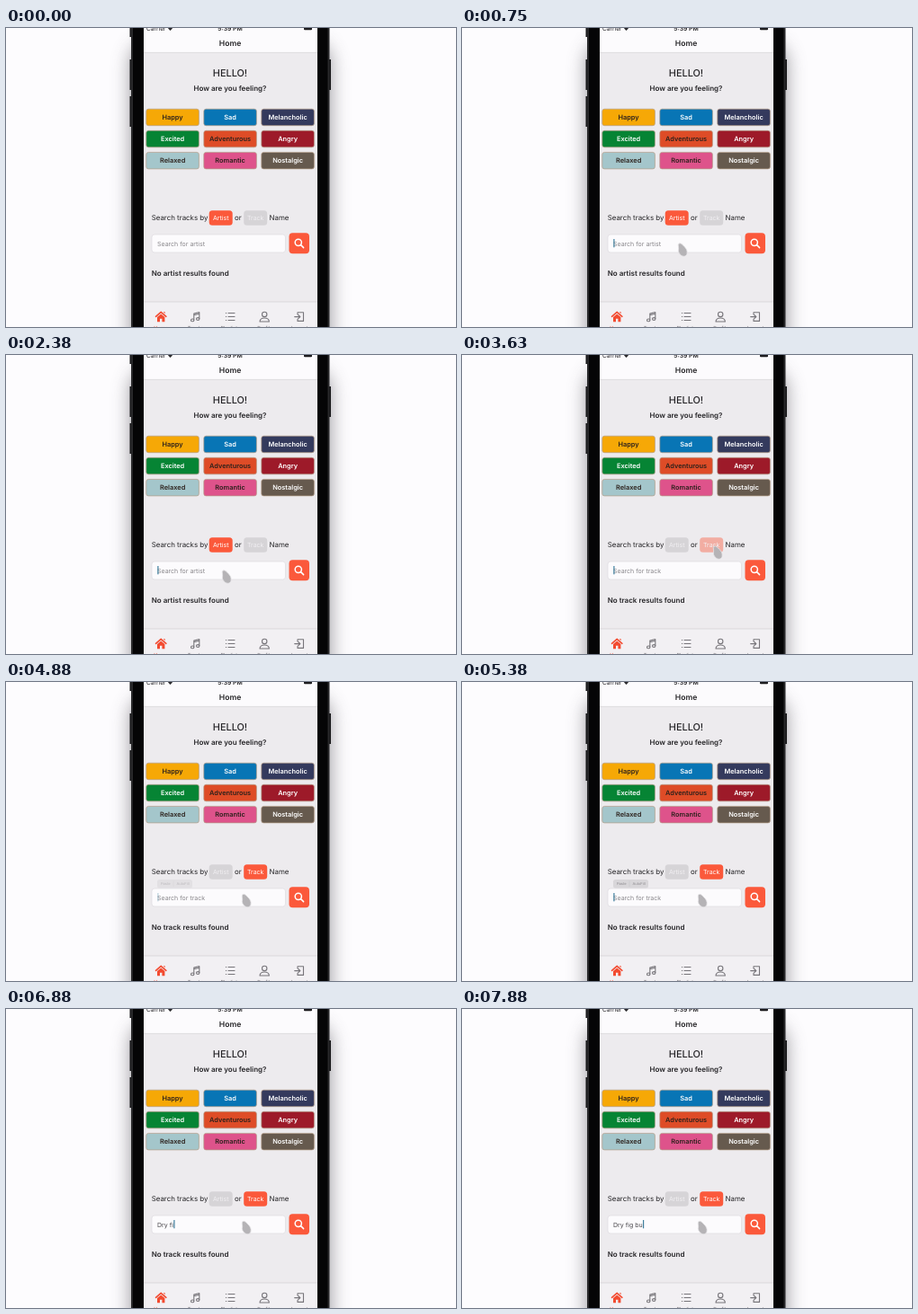
An HTML page that plays this animation: 500 by 333 pixels, repeating every 8000 ms.

```html
<!DOCTYPE html>
<html lang="en">
<head>
<meta charset="utf-8">
<title>Mood player</title>
<style>
  html, body { margin: 0; width: 100%; height: 100%; overflow: hidden; background: #fdfcfe; }
  svg { display: block; width: 100%; height: 100%; }
  text { font-family: Inter, sans-serif; fill: #252427; white-space: pre; text-rendering: geometricPrecision; }
  .icon { fill: none; stroke: #77757a; stroke-width: 1.1; stroke-linecap: round; stroke-linejoin: round; }
</style>
</head>
<body>
<svg viewBox="0 0 500 333">
  <defs>
    <filter id="soft" x="-30%" y="-20%" width="160%" height="140%"><feGaussianBlur stdDeviation="10"/></filter>
  </defs>
  <rect width="500" height="333" fill="#fdfcfe"/>
  <rect x="137" y="14" width="225" height="420" rx="25" fill="#504d55" opacity=".5" filter="url(#soft)"/>

  <g id="phone">
    <path d="M137.5 -9h4v19h-4zM137.5 35h4v34h-4zM137.5 76h4v34h-4zM357 35h4v34h-4z" fill="#19191b"/>
    <rect x="139" y="-80" width="220.5" height="500" fill="#29292b"/>
    <rect x="141" y="-80" width="216.5" height="500" fill="#050506"/>
    <rect x="153" width="193" height="333" fill="#edebee"/>
    <rect x="153" width="193" height="27" fill="#fcfbfd"/>
    <path d="M153 27.4h193" stroke="#d9d7da" stroke-width=".7"/>
    <rect x="153" y="305" width="193" height="28" fill="#f2f0f3"/>
    <path d="M153 305h193" stroke="#cfcdd0" stroke-width=".7"/>
    <path d="M180 0.2q2.5 -2 5 0l-2.5 2.8z" fill="#29282b"/>
    <rect x="331" y="-2" width="9" height="4.3" rx="1" fill="#1d1c1f"/>
  </g>

  <g id="labels"></g>

  <g class="icon">
    <path d="M166.5 321.3l5.7-5 5.7 5" stroke="#f34b30" stroke-width="1.6"/>
    <path d="M168 322l4.2-3.6 4.2 3.6v5.2h-3v-3.5h-2.4v3.5h-3zM175 316h1.5v2.5z" fill="#f34b30" stroke="none"/>
    <path d="M208.8 325v-7l6-1.4v7M208.8 319.6l6-1.4"/>
    <ellipse cx="207.2" cy="325.4" rx="1.7" ry="1.4"/>
    <ellipse cx="213.2" cy="324" rx="1.7" ry="1.4"/>
    <path d="M244.4 317.5h.3M247 317.5h7M244.4 321.5h.3M247 321.5h7M244.4 325.5h.3M247 325.5h7"/>
    <circle cx="287.2" cy="318.9" r="2.7"/>
    <path d="M282 327q.3-4 5.2-4t5.2 4z"/>
    <path d="M324 319v-2.2h6.5v9.6h-6.5v-2.2M320.7 321.6h6M324.7 319.5l2.2 2.1-2.2 2.1"/>
  </g>

  <g id="artist"><rect x="225.7" y="203.3" width="26" height="16.5" rx="3.5"/></g>
  <g id="track"><rect x="264.2" y="203.3" width="26" height="16.5" rx="3.5"/></g>

  <rect x="162" y="230" width="148.5" height="20" rx="3" fill="#fcfbfd" stroke="#dedbe0" stroke-width=".7"/>
  <rect x="314.5" y="228.3" width="22.5" height="23" rx="4" fill="#fb593b"/>
  <g fill="none" stroke="#fff" stroke-width="1.5" stroke-linecap="round">
    <circle cx="324.8" cy="238.8" r="3.6"/><path d="M327.6 241.6l3 3"/>
  </g>

  <g id="popup">
    <rect x="168" y="220" width="39" height="9.5" rx="2.5" fill="#d8d6d9"/>
    <path d="M186 221.5v6.5" stroke="#c3c1c4" stroke-width=".5"/>
  </g>
  <g id="suggestion"><rect x="172" y="222.5" width="28" height="7" rx="2" fill="#d8d6d9"/></g>
  <rect id="caret" y="235" width="1.2" height="9.3" fill="#3f7f9d"/>
  <path id="hand" d="M1 0C3-.8 5 1 6.5 3C9 5 10.8 8 10 11.5C9.3 14.4 6 15 3.5 13.2C.8 11.2-.2 8.5.6 6.2C1 4.5-.6 1.5 1 0Z"
        fill="#b5b3b6" stroke="#e8e6e9" stroke-width=".8"/>
</svg>

<script>
const LOOP = 8000;
const $ = id => document.getElementById(id);

function make(parent, name, attrs) {
  const el = document.createElementNS("http://www.w3.org/2000/svg", name);
  for (const key in attrs) el.setAttribute(key, attrs[key]);
  return parent.appendChild(el);
}

function label(text, x, y, size, { weight = 400, fill = "#252427", anchor = "start", parent = $("labels") } = {}) {
  const el = make(parent, "text", { x, y, "font-size": size, "font-weight": weight, "text-anchor": anchor });
  el.style.fill = fill;
  el.textContent = text;
  return el;
}
const centered = (text, x, y, size, options) => label(text, x, y, size, { anchor: "middle", ...options });

label("Carrier", 156, 2.6, 6.6);
centered("5:39 PM", 249, 2.6, 6.8, { weight: 600 });
centered("Home", 249, 20, 8.6, { weight: 600 });
centered("HELLO!", 249, 53.7, 10.9, { weight: 500 });
centered("How are you feeling?", 249, 70, 8, { weight: 600 });

const dark = "#2c211c", light = "#fff";
[
  ["Happy", "#f6a806", dark], ["Sad", "#0875b5", light], ["Melancholic", "#343a5d", light],
  ["Excited", "#068434", light], ["Adventurous", "#de4c27", dark], ["Angry", "#9d1a29", light],
  ["Relaxed", "#a4c6cb", dark], ["Romantic", "#de538b", dark], ["Nostalgic", "#665a4e", light]
].forEach(([mood, color, ink], i) => {
  const x = 155.8 + i % 3 * 64, y = 90.2 + Math.floor(i / 3) * 24.1;
  make($("labels"), "rect", { x, y, width: 58.6, height: 18.5, rx: 2.5, fill: color,
    stroke: "#b59d87", "stroke-width": .7 });
  centered(mood, x + 29.3, y + 12, 7.4, { weight: 600, fill: ink });
});

label("Search tracks by", 161.7, 214.3, 7.9);
label("or", 254, 214.3, 7.9);
label("Name", 292.5, 214.3, 7.9);
["Home", "Tracks", "Playlists", "Profile", "Logout"].forEach((name, i) =>
  centered(name, 172.2 + i * 38.5, 335.6, 5.6, { fill: i ? "#77757a" : "#f34b30" }));

const artistText = centered("Artist", 238.7, 214.1, 7, { parent: $("artist") });
const trackText = centered("Track", 277.2, 214.1, 7, { parent: $("track") });
const results = label("", 161.7, 276, 8, { weight: 600 });
const field = label("", 168, 242.5, 7, { parent: document.querySelector("svg") });
$("caret").before(field);

const popupInk = { fill: "#8c8a8e", anchor: "middle" };
label("Paste", 177.3, 226.2, 4, { ...popupInk, parent: $("popup") });
label("AutoFill", 196.6, 226.2, 4, { ...popupInk, parent: $("popup") });
label("Dr, Dry", 186, 227.6, 4, { ...popupInk, parent: $("suggestion") });

const query = "Dry fig bu";
const keyTimes = [5750, 5940, 6200, 6500, 6700, 6880, 7060, 7240, 7740, 7870];

const ramp = (t, start, end) => Math.min(1, Math.max(0, (t - start) / (end - start)));
const ease = p => p * p * (3 - 2 * p);

function paintToggle(id, text, active) {
  $(id).querySelector("rect").style.fill = active ? "#fb593b" : "#d6d4d7";
  text.style.fill = active ? "#fff" : "#f1eff2";
}

function caretAlpha(t) {
  if (t < 250) return 0;
  if (t >= keyTimes[0]) return 1;
  const phase = t < 750 ? 400 : t % 1000;
  return phase < 750 ? ramp(phase, 200, 380) : 1 - ramp(phase, 750, 950);
}

function draw(t) {
  const byTrack = t >= 3620;
  paintToggle("artist", artistText, !byTrack);
  paintToggle("track", trackText, byTrack);
  $("track").style.opacity = byTrack ? .42 + .58 * ramp(t, 3640, 3900) : 1;

  const kind = byTrack ? "track" : "artist";
  const typed = query.slice(0, keyTimes.filter(time => t >= time).length);
  results.textContent = `No ${kind} results found`;
  field.textContent = typed || `Search for ${kind}`;
  field.style.fill = typed ? "#49474b" : "#88868a";

  $("caret").setAttribute("x", 168.3 + (typed ? field.getComputedTextLength() : 0));
  $("caret").style.opacity = caretAlpha(t);

  $("popup").style.opacity = ramp(t, 4760, 5000) * (1 - ramp(t, 5600, 5800));
  $("suggestion").style.opacity = .5 * ramp(t, 5800, 5950) * (1 - ramp(t, 6000, 6250));

  const toTrack = ease(ramp(t, 3000, 3380)), toField = ease(ramp(t, 3750, 4200));
  const x = 240 + 39 * toTrack - 17 * toField;
  const y = 240 - 27 * toTrack + 23.5 * toField;
  $("hand").setAttribute("transform", `translate(${x} ${y})`);
  $("hand").style.opacity = ramp(t, 130, 400);
}

function tick() {
  draw(performance.now() % LOOP);
  requestAnimationFrame(tick);
}
tick();
</script>
</body>
</html>
```
